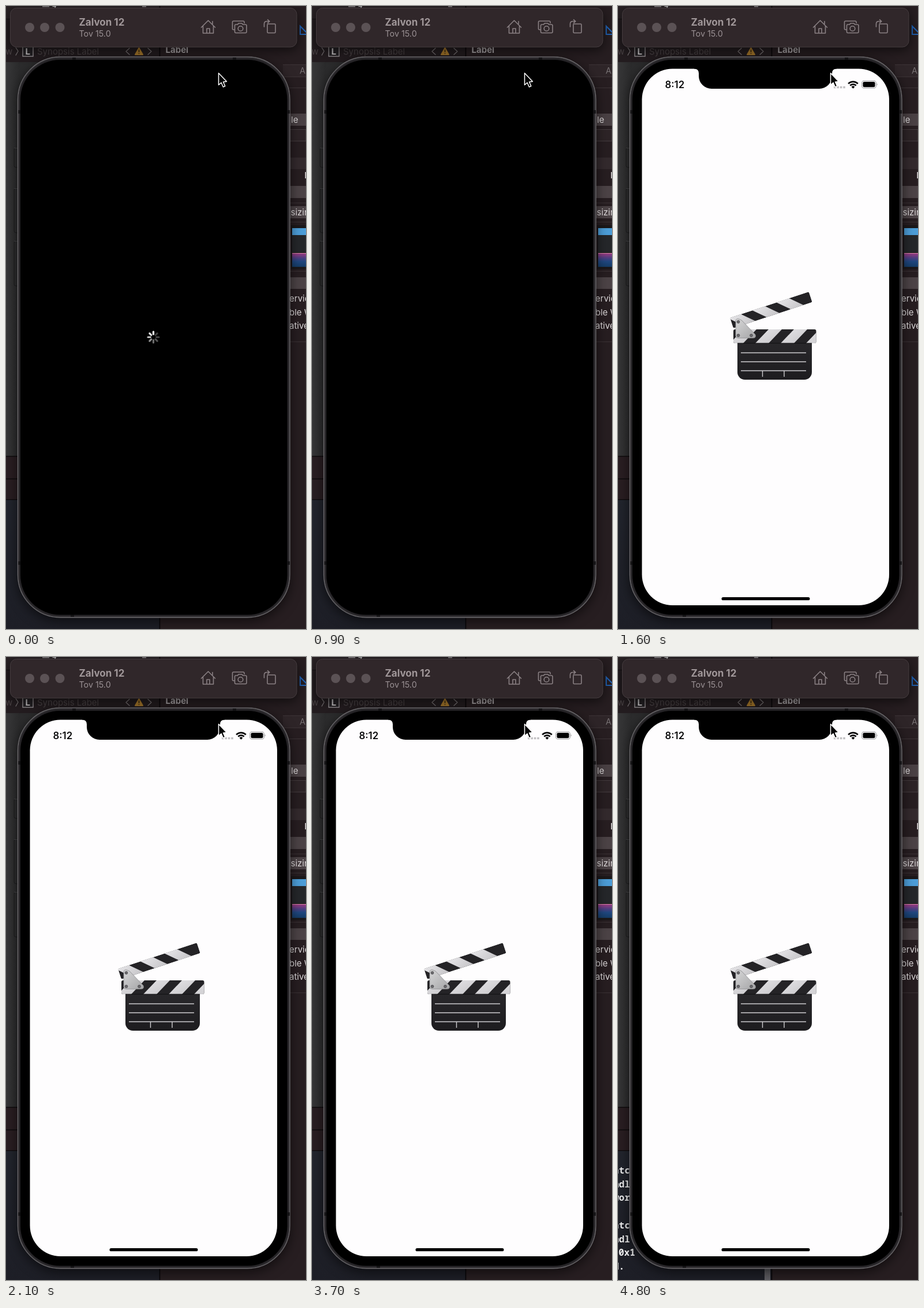
Recreate the animation shown at these times as an HTML page. Size 520 by 1077 pixels, loop 5 s.

```html
<!DOCTYPE html>
<html lang="en">
<head>
<meta charset="utf-8">
<title>Simulator launch</title>
<style>
  html, body { margin: 0; width: 100%; height: 100%; overflow: hidden; background: #211a1d; }
  svg { display: block; width: 520px; height: 1077px; }
  text { font-family: Inter, "Open Sans", sans-serif; white-space: pre; }
  #log text { font: 700 16px "Noto Sans Mono", "DejaVu Sans Mono", monospace; fill: #f1f1f2; }
  .line { fill: none; stroke-linecap: round; stroke-linejoin: round; }
  .shadow { filter: drop-shadow(0 5px 10px rgba(0, 0, 0, .6)); }

  /* One loop is 5 s; every change is a hard cut. */
  .spinner { animation: spinner-on 5s step-end infinite; }
  .blades { transform-origin: 255.5px 572.5px; animation: turn 5s infinite; }
  .app { animation: app-on 5s step-end infinite; }
  .page { animation: page-tint 5s step-end infinite; }
  .veil { animation: veil 5s step-end infinite; }
  .console { animation: console-on 5s step-end infinite; }

  @keyframes spinner-on { 0% { opacity: 1 } 18%, 100% { opacity: 0 } }
  @keyframes turn {
    0% { transform: rotate(0deg); animation-timing-function: steps(9, end) }
    18%, 100% { transform: rotate(405deg) }
  }
  @keyframes app-on { 0% { opacity: 0 } 26%, 100% { opacity: 1 } }
  @keyframes page-tint { 0% { fill: #fbf9fd } 28%, 100% { fill: #fefdfe } }
  @keyframes veil { 0% { opacity: 1 } 28%, 100% { opacity: 0 } }
  @keyframes console-on { 0% { opacity: 0 } 88%, 100% { opacity: 1 } }
</style>
</head>
<body>
<svg viewBox="0 0 520 1077">
  <defs>
    <linearGradient id="canvasTone"><stop stop-color="#363637"/><stop offset="1" stop-color="#2b2b2c"/></linearGradient>
    <linearGradient id="consoleTone" x2="0" y2="1"><stop stop-color="#22252d"/><stop offset="1" stop-color="#1d1e26"/></linearGradient>
    <linearGradient id="sunset" x2="0" y2="1"><stop stop-color="#a03a80"/><stop offset=".35" stop-color="#503e80"/><stop offset=".6" stop-color="#20477f"/><stop offset="1" stop-color="#153c66"/></linearGradient>
    <linearGradient id="barTone" x2="0" y2="1"><stop stop-color="#8a888b"/><stop offset="1" stop-color="#383639"/></linearGradient>
    <linearGradient id="slate" x2="0" y2="1"><stop stop-color="#29282b"/><stop offset="1" stop-color="#1d1c1f"/></linearGradient>
    <linearGradient id="chalk" y2="1"><stop stop-color="#e6e5e8"/><stop offset="1" stop-color="#c6c5c8"/></linearGradient>
    <linearGradient id="steel" x2="1" y2="1"><stop stop-color="#d7d7d8"/><stop offset="1" stop-color="#a4a4a6"/></linearGradient>
    <clipPath id="upperArm"><rect width="144" height="19" rx="2.5"/></clipPath>
    <clipPath id="lowerArm"><rect x="200" y="559" width="143.5" height="24" rx="3"/></clipPath>
  </defs>

  <!-- editor window, left -->
  <rect width="267" height="97" fill="#241d20"/>
  <rect width="267" height="22" fill="#292225"/>
  <path d="M0 22.5H267" stroke="#151113"/>
  <g font-size="15" fill="#8d8789">
    <text x="80" y="3" font-size="11" font-weight="700" fill="#bbb">4</text>
    <path d="M63 1h12M236 1h7" stroke="#7b7678" stroke-width="2"/>
    <text x="-1" y="84" fill="#4b4446">w</text>
    <text x="54" y="84" fill="#494244">Synopsis Label</text>
    <rect x="29" y="69" width="18" height="18" fill="#242124" stroke="#938e90" stroke-width="1.4"/>
    <text x="33.5" y="83.5" font-weight="700" fill="#c5c2c3">L</text>
    <path class="line" d="M17 72l4 6-4 7M214 73l-6 5.5 6 5.5M246 73l6 5.5-6 5.5" stroke="#777173" stroke-width="1.3"/>
  </g>
  <path d="M230.5 72.5l6.5 11.5h-13z" fill="#a97a2c" stroke="#a97a2c" stroke-width="2" stroke-linejoin="round"/>
  <path d="M230.5 75.5v4.5M230.5 81.5v1.5" stroke="#33260f" stroke-width="1.5"/>
  <rect y="97" width="267" height="681" fill="#2c2c2d"/>
  <rect y="97" width="24" height="681" fill="url(#canvasTone)"/>
  <g fill="#2e2e2f" stroke="#1d1d1e">
    <rect x="14" y="245" width="20" height="34" rx="3"/>
    <rect x="14" y="315" width="20" height="77" rx="3"/>
    <rect x="14" y="406" width="20" height="78" rx="3"/>
  </g>
  <path d="M14 245.5h8M14 315.5h8M14 406.5h8" stroke="#484849"/>
  <rect y="778" width="267" height="76" fill="#291e22"/>
  <path d="M0 778.5H267M0 817.5H267M0 853.5H267" stroke="#0d0a0b" stroke-width="1.4"/>
  <rect y="854" width="267" height="223" fill="url(#consoleTone)"/>

  <g class="console">
    <g id="log"></g>
    <rect x="254" y="1056" width="10" height="21" fill="#5c5b60"/>
  </g>

  <!-- inspector, right -->
  <rect x="267" width="253" height="1077" fill="#271e21"/>
  <path d="M266.5 0V1077" stroke="#080607" stroke-width="1.6"/>
  <text x="276.5" y="81" font-size="15" font-weight="700" fill="#aaa5a7">Label</text>
  <path d="M510 35v14h14z" fill="none" stroke="#2264b7" stroke-width="2.2"/>
  <rect x="480" y="102" width="40" height="20" fill="#2e2528"/>
  <path d="M480 101.5h40M480 122.5h40M480 141.5h40" stroke="#3c3336"/>
  <text x="509" y="117" font-size="14.5" fill="#767072">Auto</text>
  <rect x="480" y="186" width="40" height="21" fill="#4a4144"/>
  <rect x="480" y="213.5" width="40" height="20" fill="#2d2427" stroke="#453c3f"/>
  <rect x="480" y="262" width="40" height="20" fill="#332a2d"/>
  <rect x="480" y="311" width="40" height="21" fill="#4c4346"/>
  <rect x="480" y="346" width="40" height="21" fill="#4c4346"/>
  <path d="M480 340.5h40M480 373.5h40M480 458.5h40M480 580.5h40" stroke="#3b3235"/>
  <rect x="494" y="379" width="26" height="76" fill="#1b181a"/>
  <rect x="496" y="384" width="24" height="12" fill="#4c9dd7"/>
  <rect x="496" y="396" width="24" height="30" fill="#25272a"/>
  <rect x="496" y="427" width="24" height="24" fill="url(#sunset)"/>
  <path d="M496 427.5h24" stroke="#d98aac"/>
  <rect x="480" y="469" width="40" height="20" fill="#4c4346"/>
  <g font-size="15" fill="#dedadb">
    <text x="494" y="202">le</text>
    <text x="517.5" y="298" font-weight="700">I</text>
    <text x="493.5" y="362">sizing</text>
    <text x="491" y="511">erview</text>
    <text x="491" y="535">ble W</text>
    <text x="491" y="558">ative</text>
  </g>

  <!-- device -->
  <rect class="shadow" x="20.5" y="88" width="471.5" height="969" rx="74" fill="#252326" stroke="#747275" stroke-width="1.3"/>
  <rect x="22" y="89.5" width="468.5" height="966" rx="72" fill="none" stroke="#343235" stroke-width="1.5"/>
  <path d="M118 89v4M396 89v4M115 1052v4M21 183h4M488 183h4M21 963h4M488 963h4" stroke="#151416" stroke-width="6"/>
  <rect x="25" y="93" width="462.5" height="959.5" rx="69" fill="#000"/>

  <g class="spinner"><g id="blades" class="blades"></g></g>

  <!-- app screen -->
  <g class="app">
    <rect class="page" x="41.5" y="108.5" width="428.5" height="927.5" rx="53"/>
    <path d="M132 108H379V108.5Q371 108.5 371 116.5V121A22 22 0 0 1 349 143H162A22 22 0 0 1 140 121V116.5Q140 108.5 132 108.5Z"/>
    <text x="81.5" y="142" font-size="16.8" font-weight="600" fill="#0b0b0c">8:12</text>
    <path d="M374 140.5h20" stroke="#c1c0c2" stroke-width="3.6" stroke-dasharray="3.6 1.8"/>
    <g fill="none" stroke="#050505" stroke-width="2.7">
      <path d="M399.2 134.3a11.6 11.6 0 0 1 16.6 0"/>
      <path d="M402.3 137.5a7.3 7.3 0 0 1 10.4 0"/>
    </g>
    <path d="M407.5 142.8l-2.9-3a4.1 4.1 0 0 1 5.8 0z"/>
    <rect x="422.7" y="129.2" width="24.6" height="12.8" rx="3.8" fill="none" stroke="#9c9b9d" stroke-width="1.1"/>
    <rect x="424.5" y="131" width="21" height="9.2" rx="2.3"/>
    <path d="M448.7 133.5q2.2 2.1 0 4.3z" fill="#9c9b9d"/>

    <g transform="translate(194 539) rotate(-18.2)">
      <g clip-path="url(#upperArm)">
        <rect width="144" height="19" fill="#242326"/>
        <g id="upperStripes" fill="url(#chalk)"></g>
      </g>
    </g>
    <path d="M207 580H336V633A13 13 0 0 1 323 646H220A13 13 0 0 1 207 633Z" fill="url(#slate)"/>
    <g clip-path="url(#lowerArm)">
      <rect x="200" y="559" width="144" height="24" fill="#242326"/>
      <g id="lowerStripes" fill="url(#chalk)"></g>
    </g>
    <path d="M207 583H336" stroke="#0f0e10"/>
    <path d="M213 599.5H326M213 615H326M213 630.5H326M250.5 631V641M288 631V641" stroke="#cfced1" stroke-width="1.4"/>
    <path d="M204 545Q204 540 209 541L214 543 238 568Q240 574 234 574H208Q204 574 204 570Z" fill="url(#steel)" stroke="#8a898c" stroke-width=".8"/>
    <g fill="#6b6a6d" stroke="#47464a" stroke-width=".8">
      <circle cx="208.5" cy="546" r="2.4"/>
      <circle cx="208.5" cy="569.5" r="2.4"/>
      <circle cx="231" cy="569.5" r="2.4"/>
    </g>

    <rect x="179.5" y="1022" width="153" height="5.3" rx="2.65"/>
    <rect class="veil" x="179.5" y="1022" width="153" height="5.3" rx="2.65" fill="url(#barTone)"/>
  </g>

  <path d="M368.5 116v20.5l4.6-4 3.3 7.5 3.4-1.5-3.2-7.3 5.8-.6z" fill="#050505" stroke="#fff" stroke-width="1.5" stroke-linejoin="round"/>

  <!-- simulator title bar -->
  <rect class="shadow" x="7.5" y="3.5" width="496.5" height="67.5" rx="11" fill="#30272a" stroke="#453c3f"/>
  <g fill="#5b5255">
    <circle cx="41" cy="37" r="8"/><circle cx="67" cy="37" r="8"/><circle cx="93.5" cy="37" r="8"/>
  </g>
  <text x="126.5" y="34" font-size="17" font-weight="700" fill="#a09799">Zalvon 12</text>
  <text x="126.5" y="53" font-size="14.3" fill="#9b9295">Tov 15.0</text>
  <g class="line" stroke="#8a8184" stroke-width="1.6">
    <path d="M338.5 37L350.5 25 362.5 37M341.5 35V47H359.5V35M358 31V26.5M348 47V39H353V47"/>
    <path d="M396 41H394.5Q392.5 41 392.5 39V28Q392.5 26 394.5 26H411Q413 26 413 28V29.5"/>
    <path d="M398.5 32H401.5L403 30H409L410.5 32H415Q417 32 417 34V44.5Q417 46.5 415 46.5H398.5Q396.5 46.5 396.5 44.5V34Q396.5 32 398.5 32Z"/>
    <circle cx="406.5" cy="39" r="4.3"/>
    <rect x="453" y="31" width="14" height="15.5" rx="1.5"/>
    <path d="M447.5 36V31Q447.5 26.5 452 26.5H456.5M453.5 23.5L456.8 26.5 453.5 29.5"/>
  </g>
</svg>
<script>
  const fill = (id, items) => { document.getElementById(id).innerHTML = items.join(''); };
  const range = n => [...Array(n).keys()];

  // Blade 0 leads at the top; the tail fades anticlockwise.
  const glow = [1, .9, .74, .56, .42, .32, .27, .24];
  fill('blades', glow.map((a, i) =>
    `<rect x="253.9" y="561.5" width="3.2" height="7.4" rx="1.6" fill="#fff" opacity="${a}" transform="rotate(${-45 * i} 255.5 572.5)"/>`));

  // The two arms mirror each other about the hinge.
  const stripe = (x, y, h, lean) => `<path d="M${x} ${y}h23l${lean} ${h}h-23z"/>`;
  fill('upperStripes', range(3).map(i => stripe(44 * i - 3, 0, 19, 20)));
  fill('lowerStripes', range(4).map(i => stripe(217 + 44 * i, 559, 24, -23)));

  const log = ['atc', 'ndl', 'wor', '', 'atc', 'ndl', '0x1', 'd.'];
  fill('log', log.map((s, i) => `<text x="${s === '0x1' ? 1 : -8}" y="${893 + 23.7 * i}">${s}</text>`));
</script>
</body>
</html>
```
